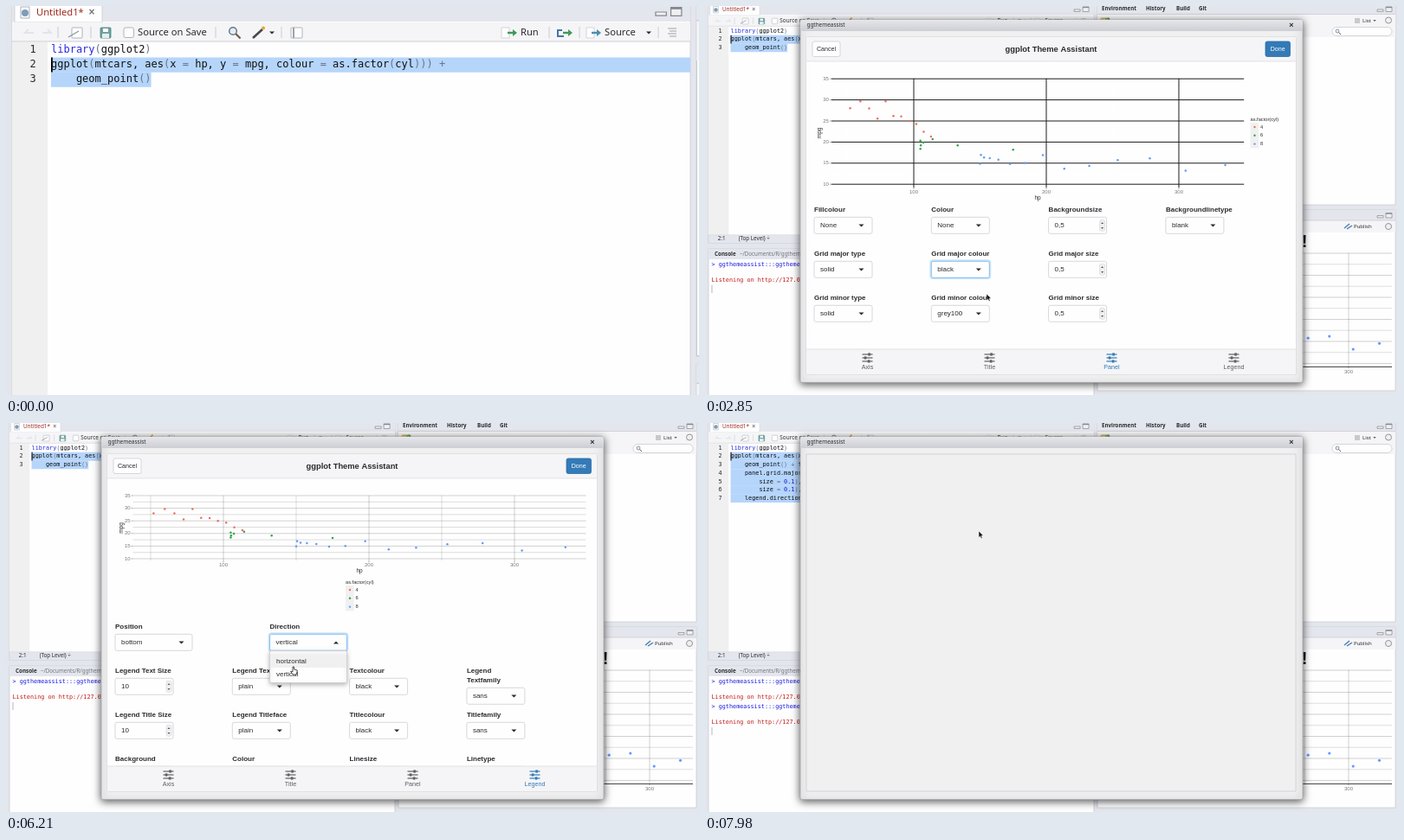
Write an HTML page with a canvas that moves like this. It is 800x450 px and loops after 8 s.

```html
<!DOCTYPE html>
<html lang="en">
<head>
<meta charset="utf-8">
<title>ggplot Theme Assistant</title>
<style>
html, body { margin: 0; width: 100%; height: 100%; overflow: hidden; background: #e4e6ed; }
canvas { display: block; width: 800px; height: 450px; }
</style>
</head>
<body>
<canvas id="stage" width="800" height="450"></canvas>
<script>
const ctx = document.getElementById('stage').getContext('2d');
const LOOP = 8000, ZOOM = 1.76;
const SANS = '"Liberation Sans", sans-serif';
const UI = '"Noto Sans", sans-serif';
const MONO = '"DejaVu Sans Mono", monospace';
const PANE = '#e4e6ed', PALE = '#f0f0f1', BAR = '#f5f5f7', WHITE = '#fefeff', EDGE = '#cbccd2';
const INK = '#2b2b2d', GREY = '#77777c', BLUE = '#337ab7', FOCUS = '#66afe9', SELECT = '#b5d5fb';

// ---- storyboard: each entry changes the state; the mouse arrives at its own time ----
const COL = i => 126 + i * 135.3, ROW = i => 236 + i * 51;
const arrow = c => [COL(c) + 55, ROW(0) + 17];
const onRow = (c, r) => [COL(c) + 55, ROW(r) + 17];
const item = (c, r, i) => [COL(c) + 30, ROW(r) + 38 + i * 15];
const spinner = r => [COL(2) + 62.5, ROW(r) + 20];
const tabX = i => 187.5 + i * 141;
const home = [29.5, 42], addins = [316, 125];

const story = [
  { at: 0, mouse: home, pointer: '', runs: 0, tab: 2, layout: 'right', fill: 'grey92', major: 'grey100', minor: 'grey100',
    position: 'right', direction: 'vertical', majorFrom: Infinity, minorFrom: Infinity },
  { at: 150, pointer: 'arrow' },
  { at: 430, mouse: addins },
  { at: 480, dialog: 'empty', runs: 1 },
  { at: 700, dialog: 'ready' },
  { at: 950, mouse: [tabX(2), 406] },
  { at: 1080, mouse: [450.5, 374] },
  { at: 1450, mouse: onRow(0, 0), open: 'fill' },
  { at: 1750, mouse: item(0, 0, 0), open: null, fill: 'None' },
  { at: 2450, mouse: onRow(1, 1), open: 'major' },
  { at: 2780, mouse: [325, 333], open: null, major: 'black' },
  { at: 3060, mouse: onRow(1, 2), open: 'minor' },
  { at: 3450, mouse: item(1, 2, 1), open: null, minor: 'black' },
  { at: 3710, mouse: spinner(1), focus: 'majorSize', majorFrom: 3710 },
  { at: 4530, mouse: spinner(2), focus: 'minorSize', minorFrom: 4530 },
  { at: 5310, mouse: [tabX(3), 406], focus: null, tab: 3 },
  { at: 5560, mouse: [202, 252], open: 'position' },
  { at: 5800, mouse: item(0, 0, 2), open: null, position: 'bottom', layout: 'below' },
  { at: 6060, mouse: [381, 252], open: 'direction' },
  { at: 6200, mouse: [331, 282], pointer: 'hand' },
  { at: 6320, mouse: [329, 275], open: null, direction: 'horizontal', layout: 'flat' },
  { at: 6330, pointer: 'arrow' },
  { at: 6560, mouse: [661, 50], dialog: null, idle: true },
  { at: 6620, inserted: true },
  { at: 7000, mouse: [177, 91], pointer: 'beam', selecting: true },
  { at: 7257, mouse: home },
  { at: 7290, pointer: '' },
  { at: 7420, pointer: 'arrow' },
  { at: 7800, mouse: addins },
  { at: 7830, dialog: 'empty', runs: 2 }
];
const stops = story.filter(e => e.mouse);
const stateAt = t => Object.assign({}, ...story.filter((e, i) => !i || e.at <= t).map(e => e.open ? { ...e, focus: e.open } : e));

function ease(t, from, to) {
  const u = Math.min(1, Math.max(0, (t - from) / (to - from)));
  return u * u * (3 - 2 * u);
}
function mouseAt(t) {
  const next = stops.findIndex(e => e.at > t);
  if (next < 0) return stops.at(-1).mouse;
  const a = stops[next - 1], b = stops[next];
  const u = ease(t, Math.max(a.at + 80, b.at - 240), b.at);
  return a.mouse.map((v, i) => v + (b.mouse[i] - v) * u);
}
// The spinner goes from 0.5 down to 0.1, one step per click.
const sizeAt = (t, from) => (5 - Math.min(4, Math.max(0, Math.floor((t - from) / 90)))) / 10;

// ---- drawing helpers ----
function box(x, y, w, h, fill, stroke, r = 0, lw = 0.8) {
  ctx.beginPath();
  ctx.roundRect(x, y, w, h, r);
  paint(fill, stroke, lw);
}
function paint(fill, stroke, lw) {
  if (fill) { ctx.fillStyle = fill; ctx.fill(); }
  if (stroke) { ctx.strokeStyle = stroke; ctx.lineWidth = lw; ctx.stroke(); }
}
function text(s, x, y, size, color = INK, { bold, align = 'left', font = SANS } = {}) {
  ctx.font = `${bold ? 'bold ' : ''}${size}px ${font}`;
  ctx.textAlign = align;
  ctx.textBaseline = 'middle';
  ctx.fillStyle = color;
  ctx.fillText(s, x, y);
}
function path(points, fill, stroke, lw = 1) {
  ctx.beginPath();
  points.forEach(([x, y]) => ctx.lineTo(x, y));
  if (fill) ctx.closePath();
  paint(fill, stroke, lw);
}
function dot(x, y, r, fill, stroke, lw = 1) {
  ctx.beginPath();
  ctx.arc(x, y, r, 0, 7);
  paint(fill, stroke, lw);
}
function placed(x, y, scale, drawing) {
  ctx.save();
  ctx.translate(x, y);
  ctx.scale(scale, scale);
  drawing();
  ctx.restore();
}
const line = (x1, y1, x2, y2, color, lw) => path([[x1, y1], [x2, y2]], null, color, lw);
const caret = (x, y, w = 3, dir = 1) => path([[x - w, y - w / 2 * dir], [x + w, y - w / 2 * dir], [x, y + w / 2 * dir]], INK);
function lens(x, y, r) {
  dot(x, y, r, '#e3edf6', '#66788a', r * .35);
  line(x + r * .7, y + r * .7, x + r * 2, y + r * 2, '#6e5a48', r * .5);
}
function goArrow(x, y, color = '#3f9a58') {
  line(x, y, x + 7, y, color, 2.4);
  path([[x + 6, y - 4], [x + 11, y], [x + 6, y + 4]], color);
}
function windowButtons(x, y, scale = 1) {
  placed(x, y, scale, () => {
    box(-4, 0, 7, 2.4, PALE, '#85868f', 0, .7);
    box(6, -3, 7, 5.5, PALE, '#85868f', 0, .7);
    line(6, -2.4, 13, -2.4, '#85868f', 1.2);
  });
}

// ---- scatter plot: a seeded cloud per number of cylinders ----
let seed = 11;
const random = () => (seed = seed * 16807 % 2147483647) / 2147483647;
function cloud(cyl, color, count, hpFrom, hpTo, skew, mpg, spread) {
  const at = Array.from({ length: count }, (_, i) => {
    const u = (i / (count - 1)) ** skew;
    return [hpFrom + (hpTo - hpFrom) * u, mpg(u) + spread * (2 * random() - 1)];
  });
  return { cyl, color, at };
}
const cars = [
  cloud(4, '#ee6f5c', 11, 52, 113, 0.9, u => 31 - 8 * u, 3),
  cloud(6, '#2fa548', 7, 105, 175, 5, () => 19.6, 1.7),
  cloud(8, '#619cf0', 14, 150, 335, 2.2, u => 16 - u, 2)
];
const frames = {
  right: { x0: 88, kx: 1.53, y0: 255, ky: 4.88 },
  below: { x0: 83, kx: 1.68, y0: 186.2, ky: 2.92 },
  flat: { x0: 83, kx: 1.68, y0: 215.7, ky: 3.76 },
  pane: { x0: 438.8, kx: 1.014, y0: 464.5, ky: 5.1 }
};
const gridColor = name => name === 'black' ? '#1c1c1e' : '#fff';

function plot({ x0, kx, y0, ky }, { fill, major, minor, majorSize, minorSize, color }) {
  const px = hp => x0 + kx * hp, py = mpg => y0 - ky * mpg;
  const l = px(37.85), r = px(349.15), top = py(35.075), bottom = py(9.225);
  if (fill) box(l, top, r - l, bottom - top, fill);
  for (const [style, lw, hp0, mpg0] of [[minor, minorSize * 1.5, 50, 12.5], [major, majorSize * 2, 100, 10]]) {
    for (let hp = hp0; hp < 349; hp += 100) line(px(hp), top, px(hp), bottom, gridColor(style), lw);
    for (let mpg = mpg0; mpg <= 35; mpg += 5) line(l, py(mpg), r, py(mpg), gridColor(style), lw);
  }
  for (const group of cars)
    for (const [hp, mpg] of group.at) dot(px(hp), py(mpg), color ? 1.6 : 1.25, color || group.color);
  for (const hp of [100, 200, 300]) {
    line(px(hp), bottom, px(hp), bottom + 2, GREY, .6);
    text(hp, px(hp), bottom + 5.5, 6, GREY, { align: 'center' });
  }
  for (let mpg = 10; mpg <= 35; mpg += 5) {
    line(l - 2, py(mpg), l, py(mpg), GREY, .6);
    text(mpg, l - 3, py(mpg), 6, GREY, { align: 'right' });
  }
  text('hp', (l + r) / 2, bottom + 12, 6.5, INK, { align: 'center' });
  ctx.save();
  ctx.translate(l - 13.5, (top + bottom) / 2);
  ctx.rotate(-Math.PI / 2);
  text('mpg', 0, 0, 6.5, INK, { align: 'center' });
  ctx.restore();
}
function legend(layout) {
  const level = layout === 'flat';
  const [x, y] = { right: [634.5, 140], below: [397, 193], flat: [410, 212] }[layout];
  text('as.factor(cyl)', x - (level ? 42 : 5), y - (level ? 0 : 9), 5.7);
  cars.forEach(({ cyl, color }, i) => {
    const kx = x + (level ? i * 19 : 0), ky = y + (level ? 0 : i * 9.8);
    box(kx - 5, ky - 4.9, 9.8, 9.8, PALE);
    dot(kx, ky, 1.2, color);
    text(cyl, kx + 6.5, ky, 5.7);
  });
}

// ---- source editor, laid out at full zoom ----
const before = ['library(ggplot2)',
  'ggplot(mtcars, aes(x = hp, y = mpg, colour = as.factor(cyl))) +',
  '    geom_point()'];
const after = [before[0], before[1],
  '    geom_point() + theme(panel.background = element_rect(fill = "NA"),',
  '    panel.grid.major = element_line(colour = "black",',
  '        size = 0.1), panel.grid.minor = element_line(colour = "black",',
  '        size = 0.1), legend.position = "bottom",',
  '    legend.direction = "horizontal")'];
const CHAR = 7.224, PITCH = 17.05, TEXT_X = 52, TEXT_Y = 51;

function tokenColor(token) {
  if (token === 'library') return '#2a2ae0';
  if (token[0] === '"') return '#0a6a1a';
  if (/^\d/.test(token)) return '#1a1ad0';
  return /^[()=+]/.test(token) ? '#687687' : '#101012';
}
function codeLine(source, y) {
  for (const m of source.matchAll(/"[^"]*"|[A-Za-z][\w.]*|[\d.]+|\S/g))
    text(m[0], TEXT_X + m.index * CHAR, y, 12, tokenColor(m[0]), { font: MONO });
}
function selection(code, [mouseX, mouseY]) {
  const row = Math.min(code.length - 1, Math.floor((mouseY * ZOOM - TEXT_Y + PITCH / 2) / PITCH));
  const col = Math.min(code[row].length, Math.max(0, Math.ceil((mouseX * ZOOM - TEXT_X) / CHAR)));
  const y = i => TEXT_Y - 8.6 + i * PITCH;
  for (let i = row; i < code.length; i++) {
    const x = TEXT_X + (i === row ? col * CHAR : 0);
    const end = i === code.length - 1 ? TEXT_X + code[i].length * CHAR : 790;
    box(x, y(i), end - x, PITCH + .3, SELECT);
  }
  box(TEXT_X + col * CHAR, y(row), 1.8, 17, '#000');
}
function toolbar() {
  const ui = { font: UI };
  box(7, 19, 783, 22, BAR);
  line(7, 41, 790, 41, EDGE, 1);
  for (const x of [60, 98, 242, 318, 627, 662, 753]) line(x, 24, x, 37, EDGE, 1);
  for (const [x, dir] of [[27, 1], [47, -1]]) path([[x + 5 * dir, 31], [x - 5 * dir, 31], [x - dir, 27]], null, '#e2e4ea', 2);
  box(76, 25, 12, 12, WHITE, '#a0a2aa', 1);
  line(72, 36, 84, 29, '#8d98a0', 1.4);
  box(109, 25, 12, 12, '#6fa3a0', '#4c7f80', 1);
  box(112, 26, 6, 4, WHITE);
  box(111, 32, 8, 5, '#e6eeee');
  box(136, 25, 11.5, 11.5, WHITE, '#a2a3aa', 2);
  text('Source on Save', 152, 31, 11.2, INK, ui);
  lens(262, 29, 4.3);
  line(285, 37, 296, 27, '#4c4648', 2.6);
  dot(297, 25.5, 2, '#e0a83a');
  caret(307, 31);
  box(329, 25, 13, 12, WHITE, '#a0a2aa', 1);
  line(332, 25, 332, 37, '#a0a2aa', 2);
  box(572, 25, 9, 12, WHITE, EDGE);
  goArrow(579, 31);
  text('Run', 594, 31, 11.2, INK, ui);
  path([[644, 35], [637, 35], [637, 28], [642, 28]], null, '#4677a8', 2);
  goArrow(643, 31);
  box(670, 25, 9, 12, WHITE, EDGE);
  goArrow(676, 31, '#4b8fb0');
  text('Source', 691, 31, 11.2, INK, ui);
  caret(742, 31);
  for (let i = 0; i < 4; i++) line(764 + i % 2 * 2, 26 + i * 3, 774, 26 + i * 3, '#a0a2aa', 1);
}
function editor(state, mouse) {
  const ui = { font: UI };
  box(7, -5, 783, 488, WHITE, EDGE);
  box(7, -5, 783, 23, PANE);
  box(10, -5, 101, 24, WHITE, EDGE);
  box(17, 1, 10, 13, WHITE, '#98a0a8');
  dot(22, 8, 4, '#7f9cb8');
  text('Untitled1*', 35, 8, 11.2, '#a02a20', ui);
  text('×', 99, 8, 12, GREY, { bold: true, align: 'center' });
  windowButtons(757, 7, ZOOM);
  toolbar();
  box(7, 42, 41, 424, PALE);
  const code = state.inserted ? after : before;
  if (state.selecting || !state.inserted) selection(code, state.selecting && state.pointer === 'beam' ? mouse : home);
  code.forEach((source, i) => {
    const y = TEXT_Y + i * PITCH;
    text(i + 1, 31, y, 12, INK, { font: MONO, align: 'center' });
    codeLine(source, y);
  });
  box(7, 466, 783, 17, PANE, EDGE);
  text('2:1', 26, 474, 11, INK, ui);
  text('(Top Level) ÷', 68, 474, 11, INK, ui);
}

// ---- remaining panes ----
const ui = { font: UI }, uiBold = { font: UI, bold: true }, mono = { font: MONO };
function consolePane({ runs, idle, dialog }) {
  box(4, 281, 445, 180, WHITE, EDGE);
  box(4, 281, 445, 12, PANE);
  text('Console', 11, 287, 6.3, INK, uiBold);
  text('~/Documents/R/ggthemeassist/', 40, 287, 6.2, GREY, ui);
  const y = i => 299 + i * 29;
  for (let i = 0; i < runs; i++) {
    text('> ggthemeassist:::ggthemeassist()', 7.5, y(i), 6.8, '#1a1ae0', mono);
    text('Listening on http://127.0.0.1:4321', 7.5, y(i) + 18.7, 6.8, '#c01a14', mono);
  }
  if (dialog) line(8, y(runs) - 5, 8, y(runs) + 4, '#a4a5ac', .8);
  else text('>', 7.5, y(runs), 6.8, '#1a1ae0', mono);
}
function rightPane(y, h, divider, barHeight) {
  box(453, y, 344, h, WHITE, EDGE);
  box(453, y, 344, barHeight, BAR);
  box(453, y, 344, divider, PANE);
  line(453, y + divider, 797, y + divider, EDGE, .8);
  windowButtons(780, y + divider - 5.5);
  dot(789, y + divider + 7, 3.5, PALE, '#93949c', 1);
}
function desktop(state, mouse) {
  box(0, 0, 800, 450, PANE);
  placed(0, 0, 1 / ZOOM, () => editor(state, mouse));
  consolePane(state);

  rightPane(-5, 235, 14.5, 41);
  [['Environment', 458], ['History', 509], ['Build', 544], ['Git', 570]].forEach(([s, x]) => text(s, x, 3.5, 6.2, INK, uiBold));
  box(457, 14, 10, 7, '#e5cd68', '#b9a04a', 1);
  placed(462, 15, .5, () => goArrow(0, 0));
  ['#8aa9c4', '#a07aa8', '#74a468'].forEach((color, i) => box(458 + i % 2 * 4, 26 + i * 2, 5, 5, color));
  for (let i = 0; i < 3; i++) line(750, 15 + i * 2, 756, 15 + i * 2, GREY, .7);
  text('List', 759, 17, 6, INK, ui);
  caret(773, 17, 1.7);
  box(724, 24.5, 69, 10, WHITE, EDGE, 5);
  lens(730, 29, 2);

  rightPane(236, 209, 12, 26);
  text('Files', 458, 242, 6.2, INK, uiBold);
  placed(467, 255, -.8, () => goArrow(0, 0, '#9cc3d4'));
  line(738, 257, 744, 252, '#4d7fb5', 1.5);
  line(741, 258, 747, 254, '#4d7fb5', 1.5);
  text('Publish', 749, 255, 6, INK, ui);
  text('!', 692, 273, 20, '#111', { bold: true, align: 'center' });
  plot(frames.pane, { major: 'black', minor: 'black', majorSize: .1, minorSize: .1, color: '#619cff' });
  line(477, 417.5, 793, 417.5, '#333336', .9);
}

// ---- theme assistant dialog ----
function field(x, y, label, value, { w = 67, number, focus, open } = {}) {
  const rows = label.split('\n');
  rows.forEach((s, i) => text(s, x, y + i * 11, 8, INK, { bold: true }));
  const top = y + 8.3 + (rows.length - 1) * 11, mid = top + 9.7;
  if (focus) box(x - 1, top - 1, w + 2, 21, null, '#cfe5f7', 3, 2);
  box(x, top, w, 19, WHITE, focus ? FOCUS : '#cfcfd2', 2);
  text(value, x + 7, mid, 8);
  if (number) {
    box(x + w - 8, top + 3, 6, 13, PALE, EDGE, 2, .5);
    caret(x + w - 5, mid - 3, 1.5, -1);
    caret(x + w - 5, mid + 3, 1.5);
    if (focus) line(x + 19, mid - 5, x + 19, mid + 5, INK, .7);
  } else caret(x + w - 12.5, mid, 3, open ? -1 : 1);
}
function shadow(blur, color, drawing) {
  ctx.save();
  Object.assign(ctx, { shadowColor: color, shadowBlur: blur, shadowOffsetY: 2 });
  drawing();
  ctx.restore();
}
function menu(x, y, w, items, hover) {
  shadow(5, '#0004', () => box(x, y, w, items.length * 15 + 7, WHITE, EDGE, 2));
  box(x + .5, y + 4 + hover * 15, w - 1, 15.5, PALE);
  items.forEach((s, i) => text(s, x + 7.5, y + 12 + i * 15, 8));
}
function sliders(x, y, color) {
  [2, -2.5, 1.5].forEach((knob, i) => {
    const ly = y - 4 + i * 4;
    line(x - 6, ly, x + 6, ly, color, 1.2);
    box(x + knob - 1.2, ly - 1.6, 2.6, 3.2, color);
  });
}

function panelForm(t, state) {
  const add = (c, r, label, value, name, number) => field(COL(c), ROW(r), label, value,
    { number, focus: name && state.focus === name, open: name && state.open === name });
  const comma = size => size.toFixed(1).replace('.', ',');
  add(0, 0, 'Fillcolour', state.fill, 'fill');
  add(1, 0, 'Colour', 'None');
  add(2, 0, 'Backgroundsize', '0,5', '', true);
  add(3, 0, 'Backgroundlinetype', 'blank');
  ['major', 'minor'].forEach((kind, i) => {
    add(0, i + 1, `Grid ${kind} type`, 'solid');
    add(1, i + 1, `Grid ${kind} colour`, state[kind], kind);
    add(2, i + 1, `Grid ${kind} size`, comma(sizeAt(t, state[kind + 'From'])), kind + 'Size', true);
  });
  const row = ['fill', 'major', 'minor'].indexOf(state.open);
  if (row >= 0) menu(COL(row && 1), ROW(row) + 27.5, 67, ['None', 'black', 'white', 'grey92'], row && 1);
}
function legendForm(t, { open, focus, position, direction }) {
  const wide = name => ({ w: 89, focus: focus === name, open: open === name });
  const secondX = 304.5;
  field(COL(0), ROW(0), 'Position', position, wide('position'));
  field(secondX, ROW(0), 'Direction', direction, wide('direction'));
  ['Text', 'Title'].forEach((kind, i) => {
    const y = ROW(i + 1);
    field(COL(0), y, `Legend ${kind} Size`, '10', { number: true });
    field(COL(1), y, `Legend ${kind}face`, 'plain');
    field(COL(2), y, `${kind}colour`, 'black');
    field(COL(3), y, `${i ? '' : 'Legend\n'}${kind}family`, 'sans');
  });
  ['Background', 'Colour', 'Linesize', 'Linetype'].forEach((s, i) => field(COL(i), ROW(3), s, ''));
  if (open === 'position') menu(COL(0), 263.5, 89, ['right', 'left', 'bottom', 'top'], 2);
  if (open === 'direction') menu(secondX, 263.5, 89, ['horizontal', 'vertical'], 0);
}
function dialog(t, state) {
  shadow(10, '#000a', () => box(110, 16, 580, 419.5, PALE, '#a5a6ad', 2));
  const shade = ctx.createLinearGradient(0, 16, 0, 29);
  shade.addColorStop(0, '#e6e6ea');
  shade.addColorStop(1, '#cdced4');
  box(110, 16, 580, 13, shade, null, 2);
  text('ggthemeassist', 117.5, 22.5, 6.4, INK, ui);
  text('×', 677, 22.5, 9, INK, { bold: true, align: 'center' });
  box(117, 36, 565, 390, PALE, EDGE);
  if (state.dialog === 'empty') return;

  ctx.save();
  ctx.beginPath();
  ctx.rect(117, 36, 565, 390);
  ctx.clip();
  const mid = { align: 'center' };
  box(117, 64, 565, 333, WHITE);
  box(117, 36, 565, 28, BAR);
  line(117, 64, 682, 64, '#dcdcdf', .8);
  box(124, 41, 32, 17.5, WHITE, '#cfcfd2', 2);
  text('Cancel', 140, 50, 7.1, INK, mid);
  text('ggplot Theme Assistant', 399.5, 50, 9.35, INK, { bold: true, align: 'center' });
  box(647, 41, 28.5, 17.5, BLUE, '#2e6da4', 2);
  text('Done', 661.2, 50, 7.1, '#fff', mid);

  // The preview follows the form a little late, and typed sizes later still.
  const shown = stateAt(t - 50);
  plot(frames[shown.layout], {
    fill: shown.fill === 'grey92' && '#e6e6e7', major: shown.major, minor: shown.minor,
    majorSize: sizeAt(t - 400, state.majorFrom), minorSize: sizeAt(t - 400, state.minorFrom)
  });
  legend(shown.layout);
  (state.tab === 3 ? legendForm : panelForm)(t, state);

  box(117, 397, 565, 30, BAR);
  line(117, 397, 682, 397, '#dcdcdf', .8);
  ['Axis', 'Title', 'Panel', 'Legend'].forEach((s, i) => {
    const color = i === state.tab ? BLUE : '#5f5f64';
    sliders(tabX(i), 407, color);
    text(s, tabX(i), 418, 7.2, color, mid);
  });
  ctx.restore();
}

const pointers = {
  arrow: () => path([[0, 0], [0, 7.4], [1.7, 5.9], [2.9, 8.6], [4.2, 8], [3, 5.4], [5.2, 5.3]], '#111', '#fff', .5),
  hand: () => path([[0, 0], [1.4, 0], [1.6, 3], [5.4, 4], [4.2, 9], [.2, 9], [-2.4, 5.2], [0, 5.6]], '#fff', '#222', .8),
  beam: () => {
    line(0, -4, 0, 4, '#222', .8);
    for (const y of [-4, 4]) line(-1.8, y, 1.8, y, '#222', .8);
  }
};

function draw(now) {
  const t = now % LOOP, state = stateAt(t), mouse = mouseAt(t);
  const closeness = t < LOOP / 2 ? 1 - ease(t, 30, 450) : ease(t, 6750, 7325) - ease(t, 7380, 7800);
  const zoom = 1 + (ZOOM - 1) * closeness;
  ctx.setTransform(zoom, 0, 0, zoom, 0, 0);
  desktop(state, mouse);
  if (state.dialog) dialog(t, state);
  if (state.pointer) placed(...mouse, 1, pointers[state.pointer]);
  requestAnimationFrame(() => draw(performance.now() - start));
}
const start = performance.now();
draw(0);
</script>
</body>
</html>
```
